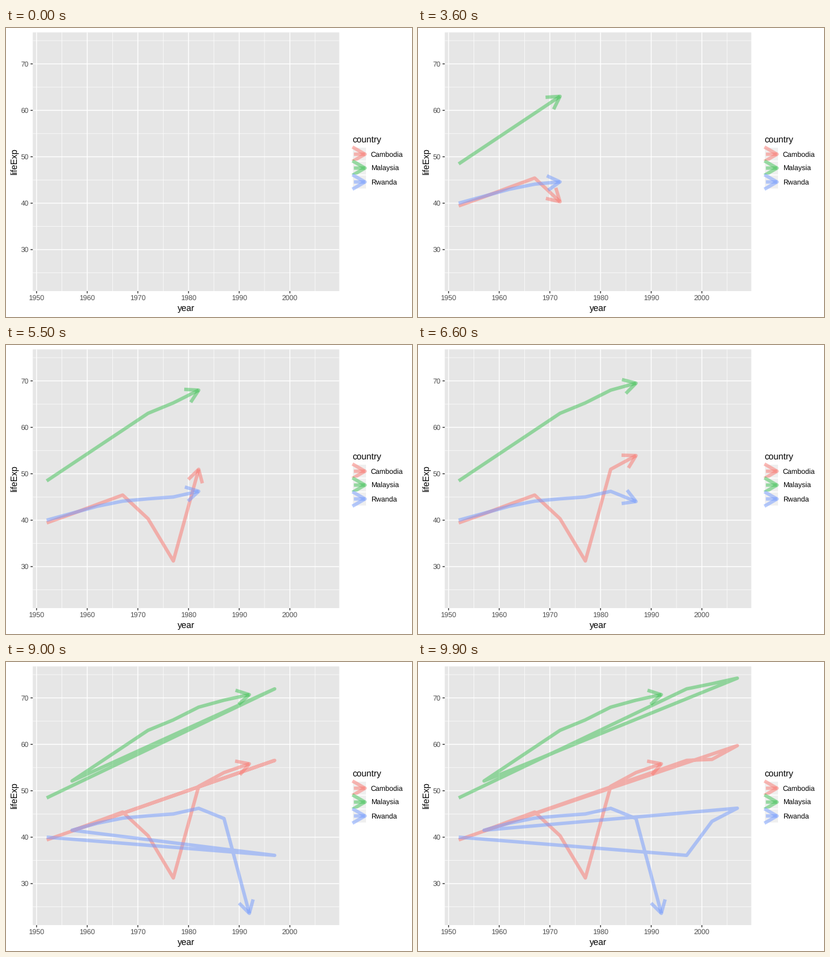
A matplotlib script that plays this animation: 672 by 480 pixels, repeating every 10 s.

```python
import matplotlib.pyplot as plt
import numpy as np
from matplotlib.animation import FuncAnimation
from matplotlib.patches import Rectangle

plt.rcParams.update({
    "font.family": "Liberation Sans",
    "text.hinting": "none",
    "path.simplify": False,
    "path.snap": False,
    "toolbar": "None",
})

WIDTH, HEIGHT, DPI = 672, 480, 96
FRAMES, INTERVAL = 100, 100
LEFT, RIGHT, TOP, BOTTOM = 44.3, 551.6, 7.33, 437.0
X_RANGE = (1949.25, 2009.75)
Y_RANGE = (21.067, 76.773)
GRID_WIDTH, TICK = 1.42, 3.67
KEY_LEFT, KEY_TOP, KEY_SIZE = 573.5, 198.1, 23.04

YEARS = np.arange(1952, 2008, 5)
SERIES = {
    "Cambodia": ("#FA766E", [39.417, 41.366, 43.415, 45.415, 40.317, 31.220,
                             50.957, 53.914, 55.803, 56.534, 56.752, 59.723]),
    "Malaysia": ("#3EC254", [48.463, 52.102, 55.737, 59.371, 63.010, 65.256,
                             68.000, 69.500, 70.693, 71.938, 73.044, 74.241]),
    "Rwanda": ("#729AFF", [40.000, 41.500, 43.000, 44.100, 44.600, 45.000,
                           46.218, 44.020, 23.599, 36.087, 43.413, 46.242]),
}
REVEAL_FRAMES = np.minimum(np.rint(np.arange(12) * FRAMES / 11), FRAMES - 1)

fig = plt.figure(figsize=(WIDTH / DPI, HEIGHT / DPI), dpi=DPI, facecolor="white")
ax = fig.add_axes([0, 0, 1, 1])
ax.set(xlim=(0, WIDTH), ylim=(HEIGHT, 0))
ax.axis("off")


def px(year):
    return np.interp(year, X_RANGE, (LEFT, RIGHT))


def py(value):
    return np.interp(value, Y_RANGE, (BOTTOM, TOP))


def stroke(xs, ys, color, width, zorder, alpha=1):
    line, = ax.plot(xs, ys, color=color, lw=width * 72 / DPI, alpha=alpha,
                    zorder=zorder, solid_capstyle="butt", solid_joinstyle="round")
    return line


def box(x, y, w, h, fill, zorder, edge="none", width=0):
    ax.add_patch(Rectangle((x, y), w, h, facecolor=fill, edgecolor=edge,
                           lw=width * 72 / DPI, zorder=zorder))


def label(x, y, text, size=8.8, color="black", ha="left", **kwargs):
    ax.text(x, y, text, fontsize=size, color=color, ha=ha,
            va=kwargs.pop("va", "baseline"), zorder=3, **kwargs)


class Arrow:
    """Translucent polyline with a separate open head at its last point."""

    def __init__(self, color, zorder):
        self.shaft = stroke([], [], color, 5.69, zorder, 0.5)
        self.head = stroke([], [], color, 5.69, zorder + 0.01, 0.5)

    def set_points(self, xs, ys):
        if len(xs) < 2:
            self.shaft.set_data([], [])
            self.head.set_data([], [])
            return
        self.shaft.set_data(xs, ys)
        back = np.arctan2(ys[-2] - ys[-1], xs[-2] - xs[-1])
        angles = back + np.radians([30, 0, -30])
        reach = np.array([24, 0, 24])
        self.head.set_data(xs[-1] + reach * np.cos(angles),
                           ys[-1] + reach * np.sin(angles))


def draw_panel():
    box(LEFT, TOP, RIGHT - LEFT, BOTTOM - TOP, "#E6E6E6", 0)
    for year in range(1955, 2006, 10):
        stroke([px(year)] * 2, [TOP, BOTTOM], "white", GRID_WIDTH / 2, 1)
    for value in range(25, 76, 10):
        stroke([LEFT, RIGHT], [py(value)] * 2, "white", GRID_WIDTH / 2, 1)
    for year in range(1950, 2001, 10):
        x = px(year)
        stroke([x, x], [TOP, BOTTOM], "white", GRID_WIDTH, 1.1)
        stroke([x, x], [BOTTOM, BOTTOM + TICK], "#333333", GRID_WIDTH, 1.1)
        label(x, 452, str(year), color="#4D4D4D", ha="center")
    for value in range(30, 71, 10):
        y = py(value)
        stroke([LEFT, RIGHT], [y, y], "white", GRID_WIDTH, 1.1)
        stroke([LEFT - TICK, LEFT], [y, y], "#333333", GRID_WIDTH, 1.1)
        label(37.7, y + 4.2, str(value), color="#4D4D4D", ha="right")
    label((LEFT + RIGHT) / 2, 469.6, "year", 11, ha="center")
    label(17.9, (TOP + BOTTOM) / 2, "lifeExp", 11, ha="right", va="center",
          rotation=90, rotation_mode="default") if False else ax.text(
        17.9, (TOP + BOTTOM) / 2, "lifeExp", fontsize=11, rotation=90,
        rotation_mode="anchor", ha="center", va="baseline", zorder=3)


def draw_legend():
    label(KEY_LEFT, 189.6, "country", 11)
    for i, (name, (color, _)) in enumerate(SERIES.items()):
        top = KEY_TOP + i * KEY_SIZE
        middle = top + KEY_SIZE / 2
        box(KEY_LEFT, top, KEY_SIZE, KEY_SIZE, "#EFEFEF", 4 + i, "white", GRID_WIDTH)
        arrow = Arrow(color, 4.1 + i)
        arrow.set_points(KEY_LEFT + KEY_SIZE * np.array([0.1, 0.9]), [middle, middle])
        label(603.9, middle + 4.2, name)


draw_panel()
draw_legend()
arrows = [(Arrow(color, 2 + 0.1 * i), py(values))
          for i, (color, values) in enumerate(SERIES.values())]


def update(frame):
    shown = int(np.sum(REVEAL_FRAMES <= frame))
    # Points connect in text order of their row numbers: 1, 10, 11, 12, 2, ...
    order = [row - 1 for row in sorted(range(1, shown + 1), key=str)]
    xs = px(YEARS[order])
    for arrow, ys in arrows:
        arrow.set_points(xs, ys[order])
    return []


anim = FuncAnimation(fig, update, frames=FRAMES, interval=INTERVAL,
                     repeat=True, repeat_delay=0, blit=False)
plt.show()
```
